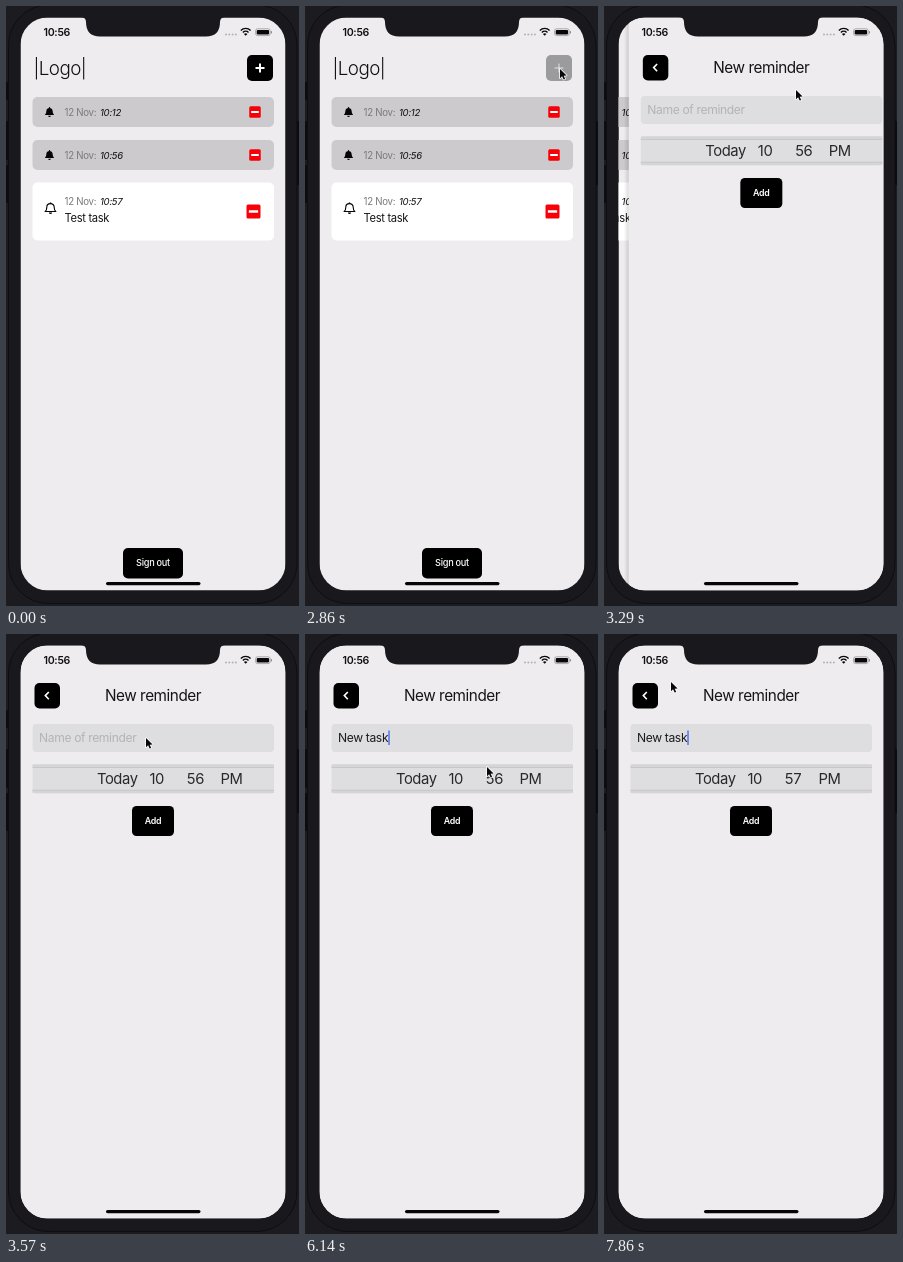
An HTML page with a canvas that plays this animation: 293 px wide and 600 px high, repeating every 8000 ms.

```html
<!DOCTYPE html>
<html lang="en">
<head>
<meta charset="utf-8">
<title>Reminder app</title>
<style>
html, body { margin: 0; width: 100%; height: 100%; overflow: hidden; background: #19181c; }
canvas { display: block; width: 293px; height: 600px; }
</style>
</head>
<body>
<canvas id="stage"></canvas>
<script>
const W = 293, H = 600, LOOP = 8000, FPS = 7;
const canvas = document.getElementById('stage');
const ctx = canvas.getContext('2d');
const ratio = window.devicePixelRatio || 1;
canvas.width = W * ratio;
canvas.height = H * ratio;

const PAGE = '#eeecef', BODY = '#19181c';
const SCREEN = { x: 14.5, y: 11.5, w: 265, h: 573 };

// Pointer keys: [step, x, y]
const POINTER = [
  [5, 203, 273], [11, 255, 63], [21, 255, 63], [22, 218, 74], [25, 140, 104],
  [39, 140, 104], [43, 182, 133], [46, 187, 141], [47, 187, 140],
  [50, 186, 128], [51, 184, 126], [54, 106, 83], [55, 67, 48]
];

const clamp = (v, lo, hi) => Math.min(hi, Math.max(lo, v));
const smooth = v => { v = clamp(v, 0, 1); return v * v * (3 - 2 * v); };

function box(x, y, w, h, r, fill) {
  ctx.beginPath();
  ctx.roundRect(x, y, w, h, r);
  ctx.fillStyle = fill;
  ctx.fill();
}

function line(points, color, width) {
  ctx.beginPath();
  points.forEach(([x, y], i) => i ? ctx.lineTo(x, y) : ctx.moveTo(x, y));
  ctx.strokeStyle = color;
  ctx.lineWidth = width;
  ctx.stroke();
}

function text(str, x, y, size, color, { style = '400', align = 'left', track = -0.03 } = {}) {
  ctx.font = `${style} ${size}px Inter, "Liberation Sans", sans-serif`;
  ctx.letterSpacing = `${size * track}px`;
  ctx.textAlign = align;
  ctx.fillStyle = color;
  ctx.fillText(str, x, y);
  return ctx.measureText(str).width;
}

function bell(x, y, s, filled) {
  ctx.save();
  ctx.translate(x, y);
  ctx.scale(s, s);
  ctx.beginPath();
  ctx.moveTo(-4.8, 2.7);
  ctx.quadraticCurveTo(-3.3, 1.5, -3.3, -1.2);
  ctx.bezierCurveTo(-3.3, -5.4, 3.3, -5.4, 3.3, -1.2);
  ctx.quadraticCurveTo(3.3, 1.5, 4.8, 2.7);
  ctx.closePath();
  ctx.fillStyle = ctx.strokeStyle = '#050505';
  ctx.lineWidth = 1;
  ctx.lineJoin = 'round';
  if (filled) ctx.fill(); else ctx.stroke();
  ctx.fillRect(-0.6, -5.4, 1.2, 1.4);
  ctx.beginPath();
  ctx.arc(0, 3.6, 1.4, 0, Math.PI);
  ctx.fill();
  ctx.restore();
}

function minus(x, y, size) {
  box(x - size / 2, y - size / 2, size, size, 1.5, '#f80008');
  box(x - size * 0.33, y - size * 0.09, size * 0.66, size * 0.18, 0, '#fff');
}

function stamp(time, y) {
  text('12 Nov:', 58.5, y, 9.7, '#7a797d');
  text(time, 94, y, 9.6, '#111', { style: 'italic 400' });
}

function doneCard(y, time) {
  box(26.5, y, 241.5, 30, 5, '#cccacd');
  bell(43.5, y + 15.3, 0.96, true);
  stamp(time, y + 18.7);
  minus(249, y + 15, 11.5);
}

function listScreen(pressed) {
  text('|Logo|', 27.5, 68.8, 18.8, '#111', { style: '300' });
  ctx.globalAlpha = pressed ? 0.35 : 1;
  box(241, 49, 26, 26, 5, '#000');
  line([[249.5, 62], [258.5, 62]], '#fff', 2);
  line([[254, 57.5], [254, 66.5]], '#fff', 2);
  ctx.globalAlpha = 1;
  doneCard(91, '10:12');
  doneCard(134, '10:56');
  box(26.5, 176.5, 241.5, 58, 5, '#fff');
  bell(44.5, 202.5, 1.12, false);
  stamp('10:57', 198.5);
  text('Test task', 58.5, 216, 11.2, '#151515');
  minus(247.5, 205.5, 14);
  box(117, 542, 60, 30.5, 5, '#000');
  text('Sign out', 147, 560.4, 9.2, '#fff', { style: '500', align: 'center' });
}

function field(f) {
  box(26.5, 90, 241.5, 28, 4, '#dedde0');
  const count = f >= 39 ? 8 : clamp(f - 29, 0, 7);
  const typed = 'New task'.slice(0, count);
  let width = 0;
  if (count) width = text(typed, 33, 108, 12.1, '#1b1b1d');
  else text('Name of reminder', 33, 108, 12.1, '#b4b3b7');
  const lit = f >= 26 && (f < 41 || (f - 41) % 7 < 4);
  if (lit) box(33.2 + width, 96.5, 1.3, 14.5, 0, '#3d62ee');
}

function picker(f) {
  box(26.5, 130, 241.5, 29.5, 3, '#dedde0');
  box(26.5, 130.5, 241.5, 3, 0, '#d5d4d7');
  box(26.5, 156, 241.5, 3, 0, '#d5d4d7');
  line([[26.5, 133.5], [268, 133.5]], '#c5c4c8', 0.8);
  line([[26.5, 156.2], [268, 156.2]], '#c5c4c8', 0.8);
  const ink = '#29292c', size = 14.8;
  text('Today', 131.5, 150, size, ink, { align: 'right' });
  text('10', 143.5, 150, size, ink);
  text('PM', 214.5, 150, size, ink);
  const roll = smooth((f - 46.5) / 4.5);
  ctx.save();
  ctx.beginPath();
  ctx.rect(178, 134, 24, 21);
  ctx.clip();
  text('56', 180.8, 150 - roll * 21, size, ink);
  if (roll) text('57', 180.8, 171 - roll * 21, size, ink);
  ctx.restore();
}

function formScreen(f) {
  box(28.5, 49, 25.5, 25.5, 5, '#000');
  line([[42.8, 58], [39.3, 61.6], [42.8, 65.2]], '#fff', 1.6);
  text('New reminder', 147, 67.3, 15.3, '#151515', { align: 'center' });
  field(f);
  picker(f);
  box(126, 172, 42, 30, 4.5, '#000');
  text('Add', 147, 190.2, 8.8, '#fff', { style: '600', align: 'center' });
}

function statusBar() {
  text('10:56', 37.5, 29.8, 10.6, '#111', { style: '600' });
  for (let i = 0; i < 4; i++) box(219 + i * 3.3, 27.4, 2, 2, 1, '#b3b2b6');
  ctx.strokeStyle = ctx.fillStyle = '#080808';
  ctx.lineWidth = 1.4;
  for (const r of [4, 6.9]) {
    ctx.beginPath();
    ctx.arc(239.7, 29.3, r, -Math.PI * 0.75, -Math.PI * 0.25);
    ctx.stroke();
  }
  ctx.beginPath();
  ctx.moveTo(239.7, 29.8);
  ctx.arc(239.7, 29.8, 2.5, -Math.PI * 0.75, -Math.PI * 0.25);
  ctx.fill();
  ctx.beginPath();
  ctx.roundRect(249.6, 22.8, 14.6, 6.8, 2);
  ctx.strokeStyle = '#8b8a8e';
  ctx.lineWidth = 0.7;
  ctx.stroke();
  box(250.7, 23.9, 12.4, 4.6, 1.2, '#080808');
  box(265, 25, 1, 2.5, 0.5, '#8b8a8e');
}

function notch() {
  ctx.beginPath();
  ctx.moveTo(75, 11);
  ctx.quadraticCurveTo(80, 11.5, 80, 16);
  ctx.quadraticCurveTo(80, 30.5, 94, 30.5);
  ctx.lineTo(200, 30.5);
  ctx.quadraticCurveTo(214, 30.5, 214, 16);
  ctx.quadraticCurveTo(214, 11.5, 219, 11);
  ctx.closePath();
  ctx.fillStyle = BODY;
  ctx.fill();
}

function phoneBody() {
  box(0, 0, W, H, 0, '#1c1b1f');
  for (const [y, h] of [[76, 18], [115, 39], [159, 38]]) box(0, y, 3, h, 1, '#0c0b0e');
  box(290.5, 115, 3, 64, 1, '#0c0b0e');
  box(2.5, -1, 288.5, 598.5, 40, BODY);
  ctx.strokeStyle = '#0e0d11';
  ctx.lineWidth = 1;
  ctx.stroke();
}

function pointer(f) {
  if (f < POINTER[0][0]) return;
  const i = Math.max(0, POINTER.findIndex(k => k[0] >= f) - 1);
  const [fa, xa, ya] = POINTER[i], [fb, xb, yb] = POINTER[i + 1];
  let p = (f - fa) / (fb - fa);
  if (i === 0) p = smooth(p);
  ctx.save();
  ctx.translate(xa + (xb - xa) * p, ya + (yb - ya) * p);
  ctx.beginPath();
  ctx.moveTo(0, 0);
  for (const [x, y] of [[0, 9.2], [2.1, 7.3], [3.6, 10.6], [5.2, 9.9], [3.7, 6.7], [6.6, 6.6]]) ctx.lineTo(x, y);
  ctx.closePath();
  ctx.lineJoin = 'round';
  ctx.strokeStyle = '#fff';
  ctx.lineWidth = 1.5;
  ctx.stroke();
  ctx.fillStyle = '#080808';
  ctx.fill();
  ctx.restore();
}

// Remaining slide distance of the form screen
function slide(f) {
  return f < 22 ? SCREEN.w : f >= 25 ? 0 : 34.3 * Math.exp(-(f - 22) * 1.2);
}

function draw(f) {
  ctx.setTransform(ratio, 0, 0, ratio, 0, 0);
  phoneBody();
  const { x, y, w, h } = SCREEN, shift = slide(f);
  ctx.save();
  ctx.beginPath();
  ctx.roundRect(x, y, w, h, 27);
  ctx.clip();
  box(x, y, w, h, 0, PAGE);
  if (shift > 0) {
    ctx.save();
    ctx.translate(-0.3 * (w - shift), 0);
    listScreen(f >= 20);
    ctx.restore();
  }
  if (shift < w) {
    ctx.save();
    ctx.translate(shift, 0);
    if (shift) {
      const shade = ctx.createLinearGradient(x - 5, 0, x, 0);
      shade.addColorStop(0, 'rgba(0,0,0,0)');
      shade.addColorStop(1, 'rgba(0,0,0,0.14)');
      box(x - 5, y, 5, h, 0, shade);
    }
    box(x, y, w, h, 0, PAGE);
    formScreen(f);
    ctx.restore();
  }
  statusBar();
  box(100, 576, 94.5, 3.2, 1.6, '#050505');
  ctx.restore();
  notch();
  pointer(f);
}

let start;
function tick(now) {
  start ??= now;
  const t = (now - start) % LOOP;
  draw(Math.floor((t + 5) * FPS / 1000) % (LOOP * FPS / 1000));
  requestAnimationFrame(tick);
}
draw(0);
requestAnimationFrame(tick);
</script>
</body>
</html>
```
